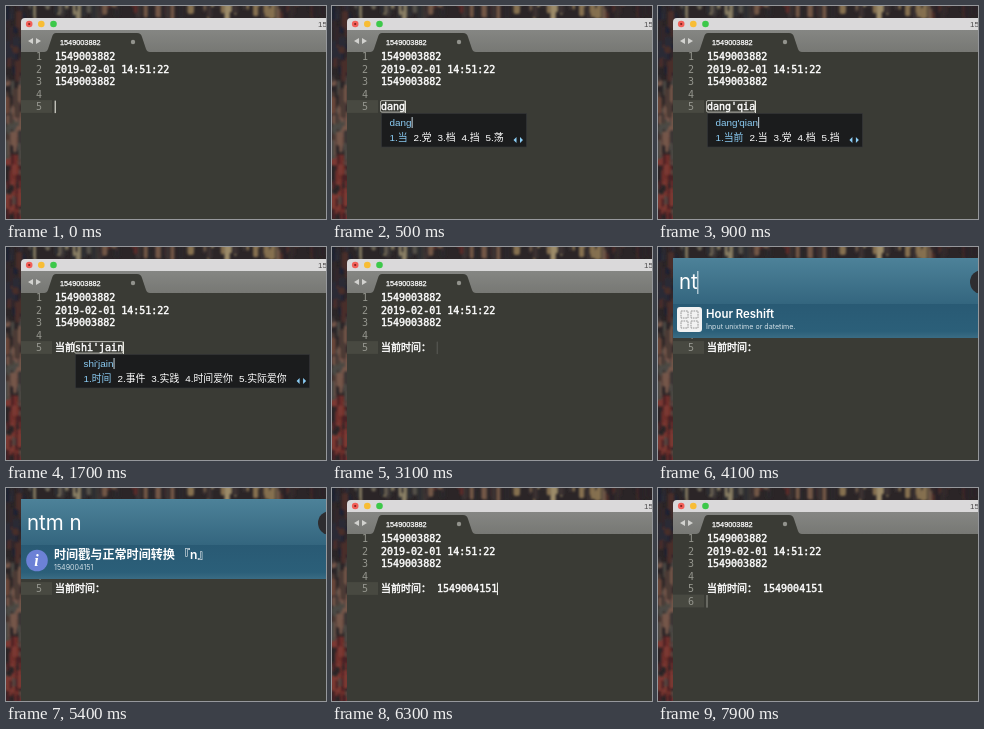
An HTML page that plays this animation: 320x213 px, repeating every 8 s.

```html
<!DOCTYPE html>
<html lang="zh-CN">
<head>
<meta charset="utf-8">
<style>
html, body { margin: 0; height: 100%; overflow: hidden; background: #2b2527; }
svg { display: block; width: 100%; height: 100%; }
text { white-space: pre; fill: #fff; font-family: "Liberation Sans", "Noto Sans CJK SC", "Noto Sans CJK", sans-serif; }
.code text { font: 10px "DejaVu Sans Mono", "Noto Sans CJK SC", "Noto Sans CJK", monospace; stroke: #fff; stroke-width: .42px; }
.code .num { fill: #94958d; stroke: none; }
.ime text { font-size: 9.9px; }
.ime .hot { fill: #8ccdf5; }
.ui text { font-family: Inter, "Noto Sans CJK SC", "Noto Sans CJK", sans-serif; }
.ui .title { font-size: 11.4px; font-weight: 600; }
.ui .sub { font-size: 7.1px; fill: #d0dee5; }
</style>
</head>
<body>
<svg viewBox="0 0 320 213" preserveAspectRatio="none">
  <defs>
    <linearGradient id="bar" x2="0" y2="1">
      <stop stop-color="#4d8299"/><stop offset="1" stop-color="#33657e"/>
    </linearGradient>
    <linearGradient id="row" x2="0" y2="1">
      <stop stop-color="#295a74"/><stop offset=".8" stop-color="#2b5f79"/><stop offset="1" stop-color="#3a6c84"/>
    </linearGradient>
    <linearGradient id="tabs" x2="0" y2="1">
      <stop stop-color="#858683"/><stop offset="1" stop-color="#777874"/>
    </linearGradient>
    <filter id="soft"><feGaussianBlur stdDeviation=".8"/></filter>
  </defs>

  <rect width="320" height="213" fill="#2b2527"/>
  <g id="wall" filter="url(#soft)"></g>

  <path d="M15 213V16q0-4 4-4H320V213z" fill="#3a3b35"/>
  <path d="M15 24V16q0-4 4-4H320V24z" fill="#dad9da"/>
  <circle cx="23.2" cy="18" r="3.3" fill="#f25f58"/>
  <circle cx="23.2" cy="18" r="1.1" fill="#7c201c"/>
  <circle cx="35.3" cy="18" r="3.3" fill="#f8bd35"/>
  <circle cx="47.5" cy="18" r="3.3" fill="#3dc84a"/>
  <text x="312" y="21" font-size="8" style="fill:#4b4a4b">1549003882</text>
  <rect x="15" y="24" width="305" height="22" fill="url(#tabs)"/>
  <path d="M38 46q3 0 4-3l4-12q1-4 4-4h81q4 0 5 4l4 12q1 3 4 3z" fill="#3a3b35"/>
  <path d="M27 32v6l-5-3zM30 32v6l5-3z" fill="#d2d2cf"/>
  <text x="54" y="38.6" font-size="7.3" stroke="#fff" stroke-width=".25">1549003882</text>
  <circle cx="127" cy="36" r="2.2" fill="#92938d"/>

  <g class="code" id="code"></g>
  <g class="ime" id="ime"></g>

  <g class="ui" id="panel">
    <rect x="15" y="11" width="305" height="47" fill="url(#bar)"/>
    <rect x="15" y="57" width="305" height="34" fill="url(#row)"/>
    <circle cx="324" cy="35" r="12" fill="#2e2d30"/>
    <text id="query" x="21" y="42.4" font-size="20.5"></text>
    <rect id="cursor" y="24" width="1" height="23" fill="#e4eef3"/>
    <g id="keyword">
      <rect x="19" y="60" width="25" height="25" rx="3" fill="#f2f2f2"/>
      <path d="M23 64h7v7h-7zM33 64h7v7h-7zM23 74h7v7h-7zM33 74h7v7h-7z" fill="none" stroke="#8d8d8d" stroke-width=".9" stroke-dasharray="1.7 .8"/>
      <text class="title" x="48" y="71">Hour Reshift</text>
      <text class="sub" x="48" y="82">Input unixtime or datetime.</text>
    </g>
    <g id="answer">
      <circle cx="31" cy="72.5" r="10.8" fill="#6c81d6"/>
      <text x="30.6" y="78" text-anchor="middle" style="font:italic bold 16px 'Liberation Serif',serif">i</text>
      <text class="title" x="48" y="71.4" style="font-size:12.1px">时间戳与正常时间转换 『n』</text>
      <text class="sub" x="48" y="82">1549004151</text>
    </g>
  </g>
</svg>
<script>
const $ = id => document.getElementById(id);
const rect = (x, y, w, h, fill, more = "") =>
  `<rect x="${x}" y="${y}" width="${w}" height="${h}" fill="${fill}" ${more}/>`;
const label = (x, y, text, cls = "") => `<text x="${x}" y="${y}" class="${cls}">${text}</text>`;

// Painted desktop: seeded upright brush dabs along the top and the left edge
let seed = 7;
const random = () => (seed = seed * 16807 % 2147483647) / 2147483647;
function dabs(count, x, y, w, h, palette) {
  const colors = palette.split(" ");
  let out = "";
  while (count--) {
    const fill = "#" + colors[Math.floor(random() * colors.length)];
    out += rect(x + random() * w, y + random() * h, 2 + random() * 5, 6 + random() * 16, fill, 'rx="2"');
  }
  return out;
}
$("wall").innerHTML =
  dabs(40, -4, 145, 18, 65, "6d2e2a 7b3932 4a2426 564540") +
  dabs(40, -4, 65, 18, 75, "4b3a36 684439 3a3436 75564a 4c4a44") +
  dabs(35, -4, -8, 18, 70, "1f2230 2b2b35 4a2f2b 30282c") +
  dabs(30, 18, -10, 75, 6, "57524b 8e8368 2f2e30 3b3634") +
  dabs(25, 92, -10, 85, 6, "5a2b27 3b3030 2c2829 735846") +
  dabs(30, 178, -10, 95, 6, "9c8b69 6d5946 3a3232 85704f") +
  dabs(16, 272, -10, 48, 6, "33292a 4f2d29 292427");

// Input method: [time, committed, composing, pinyin in popup, candidates]
const steps = [
  [0, "", "", "", ""],
  [100, "", "", "d", "的 大 到 都 等"],
  [200, "", "d", "da", "大 打 达 答 搭"],
  [300, "", "da", "dan", "但 单 蛋 担 淡"],
  [400, "", "dan", "dang", "当 党 档 挡 荡"],
  [500, "", "dang", "dang", "当 党 档 挡 荡"],
  [600, "", "dang", "dang'q", "当前 当期 当 党 档"],
  [700, "", "dang'q", "dang'qi", "当期 当 党 档 挡"],
  [800, "", "dang'qi", "dang'qia", "当 党 档 挡 荡"],
  [900, "", "dang'qia", "dang'qian", "当前 当 党 档 挡"],
  [1000, "当前", "", "", ""],
  [1100, "当前", "s", "s", "是 上 说 时 三"],
  [1200, "当前", "sh", "sh", "是 上 说 时 生"],
  [1300, "当前", "shi", "shi", "是 时 事 使 市"],
  [1400, "当前", "shi'j", "shi'j", "时间 世界 事件 实际 设计"],
  [1500, "当前", "shi'ja", "shi'ja", "时间 事件 世家 是 时"],
  [1600, "当前", "shi'jai", "shi'jai", "时间爱 实际爱 是 时 事"],
  [1700, "当前", "shi'jain", "shi'jain", "时间 事件 实践 时间爱你 实际爱你"],
  [2000, "当前时间", "", "", ""],
  [2100, "当前时间：", "", "", ""],
  [2200, "当前时间： ", "", "", ""],
  [6300, "当前时间： 1549004151", "", "", ""],
  [6500, "当前时间： 1549004151", "", "", ""]
];
const queries = [[4000, "n"], [4100, "nt"], [4200, "ntm"], [4400, "ntm "], [4600, "ntm n"]];
const last = (list, t) => list.filter(s => s[0] <= t).pop();
const clamp = v => Math.max(0, Math.min(1, v));
const lineY = n => 41.6 + 12.5 * n;
const width = s => [...s].reduce((w, c) => w + (c > "\u2fff" ? 10 : 6.02), 0);

function drawCode([time, done, typing], caret) {
  const row = time >= 6500 ? 6 : 5;
  const lines = ["1549003882", "2019-02-01 14:51:22", "1549003882", "", done + typing];
  if (row == 6) lines.push("");
  const x = 49 + width(done), y = lineY(row);
  let out = rect(15, y - 10, 31, 12.8, "#484941");
  lines.forEach((s, i) => {
    out += label(30, lineY(i + 1), i + 1, "num") + label(49, lineY(i + 1), s);
  });
  if (typing) out += rect(x - .5, y - 9.5, width(typing) + .5, 11.5, "none", 'rx="1.5" stroke="#d5d5cf" stroke-width=".8"');
  const end = row == 6 ? 48.5 : x + width(typing) - .3;
  $("code").innerHTML = out + rect(end, y - 9.5, 1, 12.5, "#f8f8f0", `opacity="${caret}"`);
}

function drawIme([, done, , pinyin, words]) {
  if (!pinyin) return $("ime").innerHTML = "";
  const left = 49.5 + width(done);
  let x = left + 8, row = "";
  words.split(" ").forEach((w, i) => {
    row += label(x, 135.4, `${i + 1}.${w}`, i ? "" : "hot");
    x += 14.1 + 9.9 * w.length;
  });
  const end = x - 6;
  $("ime").innerHTML = rect(left, 107.5, end + 23 - left, 33.5, "#1b1c1d", 'stroke="#35363a" stroke-width=".6"') +
    `<text id="pinyin" class="hot" x="${left + 8}" y="119.5">${pinyin}</text>` + row +
    `<path d="M${end + 13} 131l-3 3 3 3zM${end + 16.5} 131l3 3-3 3z" fill="#8ccdf5"/>`;
  const caretX = left + 8.2 + $("pinyin").getComputedTextLength();
  $("ime").innerHTML += rect(caretX, 111, .9, 11, "#d8e8f2");
}

function drawPanel(t) {
  const query = last(queries, t);
  const alpha = query ? clamp((5650 - t) / 200) : 0;
  $("panel").setAttribute("opacity", alpha);
  if (!alpha) return;
  $("query").textContent = query[1];
  $("cursor").setAttribute("x", 20.5 + $("query").getComputedTextLength());
  $("cursor").setAttribute("opacity", t < 5100 ? 1 : 0);
  $("keyword").style.display = t < 4800 ? "" : "none";
  $("answer").style.display = t < 4800 ? "none" : "";
}

function draw(t) {
  const step = last(steps, t);
  const phase = (t - step[0]) % 1000;
  const fadeOut = clamp((500 - phase) / 200);
  const fadeIn = clamp((phase - 880) / 120);
  const caret = t >= 4000 && t < 5650 ? 0 : Math.max(fadeOut, fadeIn);
  drawCode(step, caret);
  drawIme(step);
  drawPanel(t);
}

const start = performance.now();
function tick() {
  draw((performance.now() - start) % 8000);
  requestAnimationFrame(tick);
}
tick();
</script>
</body>
</html>
```
